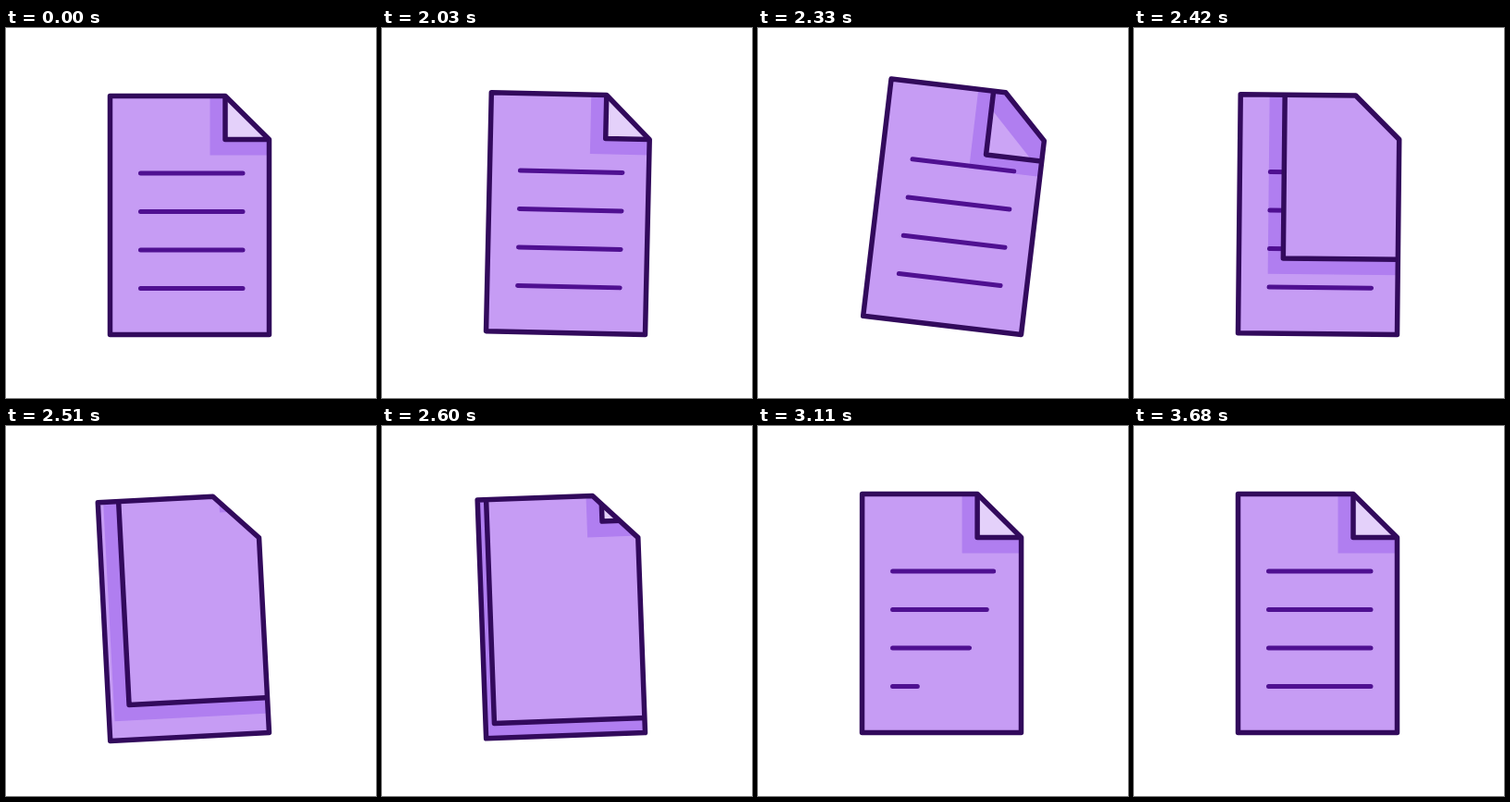
An HTML page for the animation above (4430 ms loop, 400 px wide and 400 px high).

```html
<!DOCTYPE html>
<html lang="en">
<head>
<meta charset="utf-8">
<title>Page turn</title>
<style>
  html, body { margin: 0; width: 100%; height: 100%; overflow: hidden; background: #fff; }
  svg { display: block; width: 100%; height: 100%; }
  .ink { fill: none; stroke: #320a5c; stroke-width: 5.5; stroke-linejoin: round; }
  .text { fill: none; stroke: #4f1091; stroke-width: 5; stroke-linecap: round; }
  .paper { fill: #c69cf4; }
  .shade { fill: #b07ef0; }
  .back { fill: #e4d1fa; }
</style>
</head>
<body>
<svg viewBox="0 0 400 400">
  <clipPath id="inside"><path d="M112.5 73.5H237L284.5 120.5V331.5H112.5Z"/></clipPath>
  <g id="page">
    <g clip-path="url(#inside)">
      <rect class="paper" x="100" y="60" width="200" height="290"/>
      <g id="turn">
        <path id="turnShade" class="shade"/>
        <path id="oldText" class="text"/>
        <path id="turnFill"/>
        <path id="turnEdge" class="ink"/>
      </g>
      <g id="fold">
        <path id="foldShade" class="shade"/>
        <path id="foldFill" class="back"/>
        <path id="foldEdge" class="ink"/>
      </g>
      <path id="newText" class="text"/>
    </g>
    <path class="ink" d="M112.5 73.5H237L284.5 120.5V331.5H112.5Z"/>
  </g>
</svg>
<script>
const LOOP = 4430, STEP = 30, OFFSET = 20;
const LEFT = 112.5, TOP = 73.5, RIGHT = 284.5, BOTTOM = 331.5;
const FOLD = { x: 237, y: 120.5, size: 47.3 };
const ROWS = [157, 198.5, 240, 281.5];
const TEXT_X = 145.5, TEXT_W = 110.5;

const $ = id => document.getElementById(id);
const clamp = u => Math.min(1, Math.max(0, u));
const lerp = (a, b, u) => a + (b - a) * u;
const span = (t, start, length) => clamp((t - start) / length);
const quadOut = u => 1 - (1 - u) ** 2;
const sineInOut = u => (1 - Math.cos(Math.PI * u)) / 2;

// Cubic bezier (0.167, 0, 0, 1): quick start, long settle.
function settle(u) {
  if (u <= 0 || u >= 1) return clamp(u);
  let lo = 0, hi = 1;
  for (let i = 0; i < 24; i++) {
    const s = (lo + hi) / 2;
    if (0.5 * s * (1 - s) ** 2 + s ** 3 < u) lo = s; else hi = s;
  }
  return lo * lo * (3 - 2 * lo);
}

// Start, end, angle reached, easing
const SWINGS = [
  [2000, 2312, 7, quadOut],
  [2312, 2495, -3, sineInOut],
  [2495, 2870, 2, sineInOut],
  [2870, 3130, 0, sineInOut]
];

function tilt(t) {
  let angle = 0;
  for (const [start, end, goal, ease] of SWINGS) {
    if (t < start) break;
    angle = lerp(angle, goal, ease(span(t, start, end - start)));
  }
  return angle;
}

const mix = (a, b, u) => `rgb(${a.map((v, i) => Math.round(lerp(v, b[i], u)))})`;

function drawCorner(name, x, y, size) {
  $(name + 'Shade').setAttribute('d', `M${x - 16.5} 60V${y + 17}H300V60Z`);
  $(name + 'Fill').setAttribute('d', `M${x} ${y - size}V${y}H${x + size}Z`);
  $(name + 'Edge').setAttribute('d', `M${x} 60V${y}H300`);
}

const textPath = grow => ROWS.map((y, i) => {
  const part = grow(i);
  return part < 0.02 ? '' : `M${TEXT_X} ${y}h${TEXT_W * part}`;
}).join('');

function show(id, visible) {
  $(id).style.display = visible ? '' : 'none';
}

function render(time) {
  const t = Math.floor((time - OFFSET) / STEP) * STEP + OFFSET;
  $('page').setAttribute('transform', `rotate(${tilt(t)} ${RIGHT} ${BOTTOM})`);

  const p = settle(span(t, 2292, 525));
  show('turn', p < 1);
  drawCorner('turn', lerp(FOLD.x, LEFT, p), lerp(FOLD.y, BOTTOM, p),
    FOLD.size + 420 * Math.max(0, p - 0.1));
  $('turnFill').setAttribute('fill', mix([228, 209, 250], [198, 156, 244], clamp(p * 8)));

  const away = 3.2 * (1 - quadOut(span(t, 2480, 280)));
  show('fold', t > 2480);
  drawCorner('fold', FOLD.x + 9 * away, FOLD.y - 18.2 * away, FOLD.size + 40 * away);

  $('newText').setAttribute('d', textPath(i => settle(span(t, 2585 + 152 * i, 645))));
}

$('oldText').setAttribute('d', textPath(() => 1));
const began = performance.now();
function tick() {
  render((performance.now() - began) % LOOP);
  requestAnimationFrame(tick);
}
tick();
</script>
</body>
</html>
```
